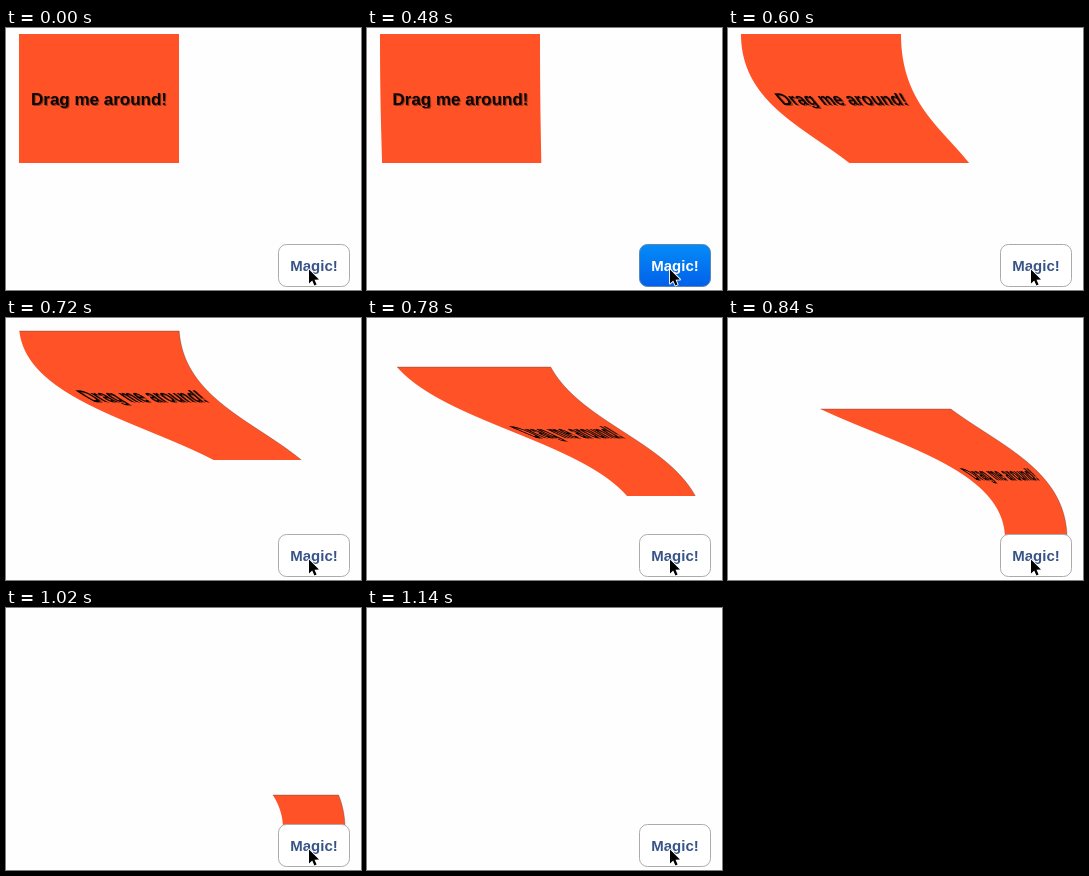
Animation of 355 by 262 pixels, one loop 1260 ms. Source, as an HTML page with a canvas:

```html
<!DOCTYPE html>
<html lang="en">
<head>
<meta charset="utf-8">
<title>Genie effect</title>
<style>
  html, body { margin: 0; width: 100%; height: 100%; overflow: hidden; background: #fefefe; }
  canvas { display: block; width: 100vw; height: 100vh; }
</style>
</head>
<body>
<canvas id="stage" width="355" height="262"></canvas>
<script>
const ctx = document.getElementById('stage').getContext('2d');
const FONT = '"Liberation Sans", Arial, sans-serif';

const LOOP = 1260, START = 480, STEP = 60;
// Animation progress per step; the playback hesitates slightly twice.
const PROGRESS = [.025, .125, .225, .3, .375, .5, .6, .7, .725, .825, .925, 1];

const card = { x: 13, y: 6, w: 160, h: 129 };
const dest = { x: 277, y: 221, w: 62 };

const clamp = v => Math.min(1, Math.max(0, v));
const phase = (p, from, to) => clamp((p - from) / (to - from));
const smooth = t => t * t * (3 - 2 * t);

// Horizontal share of an S-shaped Bezier at the given vertical share.
function curveAt(share) {
  let lo = 0, hi = 1;
  for (let i = 0; i < 24; i++) {
    const u = (lo + hi) / 2;
    if (1.5 * u * (1 - u) + u * u * u < share) lo = u; else hi = u;
  }
  return smooth(lo);
}

// Left edge and width of the card where it crosses height y.
function spanAt(y, bend) {
  const k = bend * curveAt(clamp((y - card.y) / (dest.y - card.y)));
  return {
    left: card.x + k * (dest.x - card.x),
    width: card.w + k * (dest.w - card.w)
  };
}

function drawLabel() {
  ctx.font = 'bold 17px ' + FONT;
  ctx.textAlign = 'center';
  ctx.fillStyle = 'rgba(60, 30, 20, .55)';
  ctx.fillText('Drag me around!', card.w / 2 + 1, 72);
  ctx.fillStyle = '#0c0605';
  ctx.fillText('Drag me around!', card.w / 2, 71);
}

function drawWarpedLabel(top, bottom, bend) {
  for (let row = 54; row < 80 && top + row < bottom; row++) {
    const y = top + row + .5;
    const a = spanAt(y - .5, bend), b = spanAt(y + .5, bend), mid = spanAt(y, bend);
    const slope = b.left + b.width / 2 - a.left - a.width / 2;
    ctx.save();
    ctx.beginPath();
    ctx.rect(0, top + row, 355, 1);
    ctx.clip();
    ctx.transform(mid.width / card.w, 0, slope, 1, mid.left - slope * (row + .5), top);
    drawLabel();
    ctx.restore();
  }
}

function drawCard(p) {
  const bend = smooth(phase(p, 0, .4));
  const slide = smooth(phase(p, .3, 1));
  const top = Math.round(card.y + slide * (dest.y - card.y));
  const bottom = Math.min(top + card.h, dest.y);
  if (top >= bottom) return;

  const left = [], right = [];
  for (let y = top; y <= bottom; y++) {
    const s = spanAt(y, bend);
    left.push([s.left, y]);
    right.push([s.left + s.width, y]);
  }
  const trace = points => {
    ctx.beginPath();
    points.forEach(([x, y]) => ctx.lineTo(x, y));
  };
  trace([...right, ...left.slice().reverse()]);
  ctx.fillStyle = '#ff5226';
  ctx.fill();

  if (slide > 0) {
    trace([left[0], ...right]);
    ctx.strokeStyle = 'rgba(60, 50, 50, .45)';
    ctx.lineWidth = .7;
    ctx.stroke();
  }
  if (bend > 0) {
    drawWarpedLabel(top, bottom, bend);
  } else {
    ctx.save();
    ctx.translate(card.x, card.y);
    drawLabel();
    ctx.restore();
  }
}

function drawButton(pressed) {
  ctx.beginPath();
  ctx.roundRect(272.5, 216.5, 71, 42, 8);
  if (pressed) {
    const blue = ctx.createLinearGradient(0, 216, 0, 259);
    blue.addColorStop(0, '#058cf7');
    blue.addColorStop(1, '#0160ea');
    ctx.fillStyle = blue;
  } else {
    ctx.fillStyle = '#fff';
  }
  ctx.fill();
  ctx.strokeStyle = pressed ? '#5c87b5' : '#ababab';
  ctx.lineWidth = 1;
  ctx.stroke();

  ctx.font = 'bold 15px ' + FONT;
  ctx.textAlign = 'center';
  ctx.fillStyle = pressed ? '#fff' : '#385487';
  ctx.fillText('Magic!', 308, 243);
}

function drawCursor() {
  const shape = [[0, 0], [0, 14], [3.2, 11], [5.4, 16], [7.6, 15], [5.5, 10.2], [10, 10]];
  ctx.save();
  ctx.translate(303, 241.5);
  ctx.beginPath();
  shape.forEach(([x, y]) => ctx.lineTo(x, y));
  ctx.closePath();
  ctx.lineJoin = 'round';
  ctx.lineWidth = 1.8;
  ctx.strokeStyle = '#fff';
  ctx.stroke();
  ctx.fillStyle = '#000';
  ctx.fill();
  ctx.restore();
}

function draw(time) {
  const t = time % LOOP;
  const step = Math.floor((t - START) / STEP);
  const p = step < 0 ? 0 : PROGRESS[Math.min(step, PROGRESS.length - 1)];
  ctx.fillStyle = '#fefefe';
  ctx.fillRect(0, 0, 355, 262);
  drawCard(p);
  drawButton(step === 0);
  drawCursor();
}

const began = performance.now();
function tick() {
  draw(performance.now() - began);
  requestAnimationFrame(tick);
}
tick();
</script>
</body>
</html>
```
